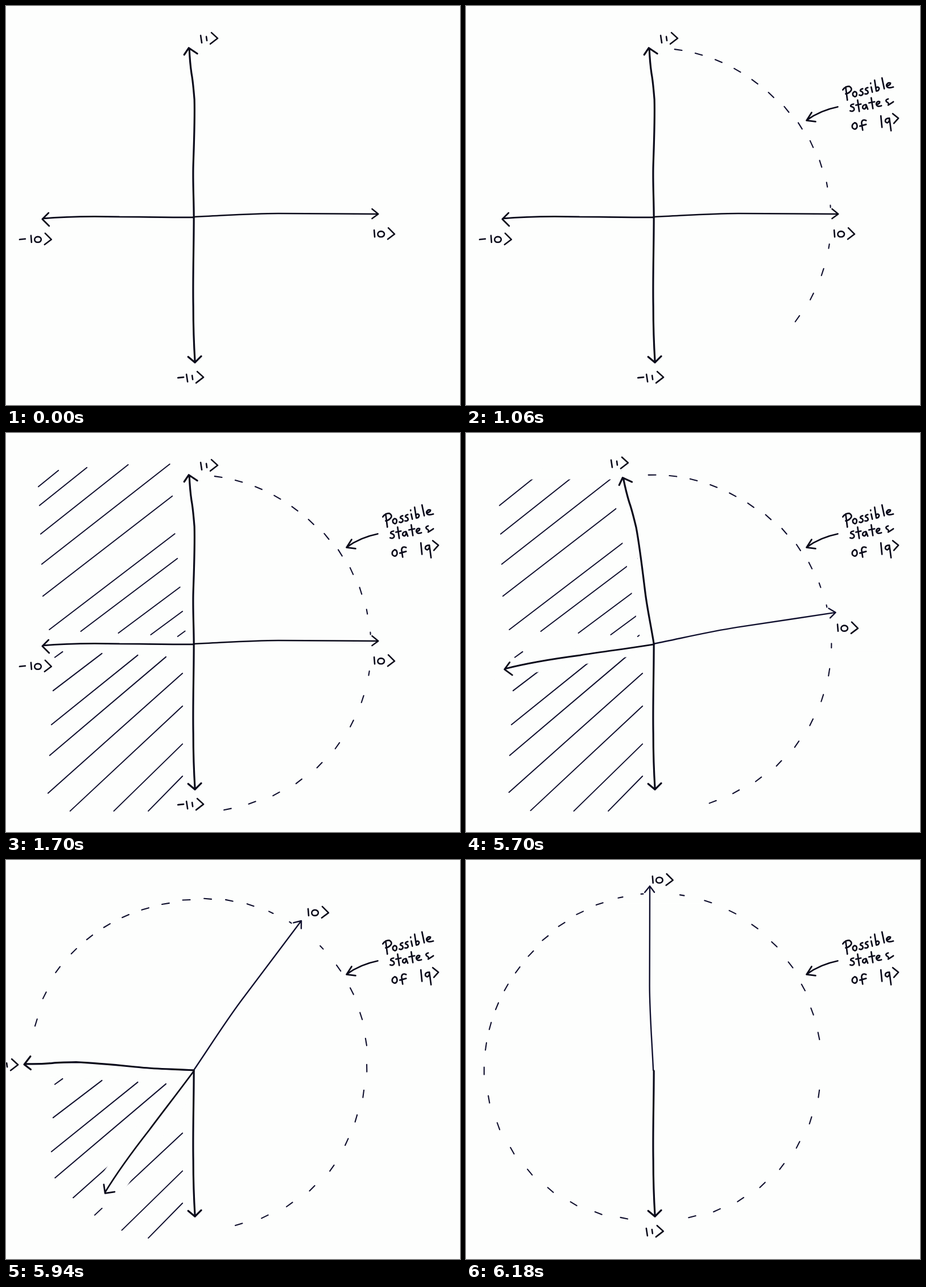
Animation of 798x702 px, one loop 8 s. Source, as an HTML page with a canvas:

```html
<!DOCTYPE html>
<html lang="en">
<head>
<meta charset="utf-8">
<title>Possible states of |q></title>
<style>
html, body { margin: 0; width: 100%; height: 100%; overflow: hidden; background: #fdfefd; }
canvas { display: block; }
</style>
</head>
<body>
<canvas id="stage" width="798" height="702" role="img" aria-label="Axes |0>, |1>, -|0>, -|1>. Possible states of |q>"></canvas>
<script>
const g = document.getElementById('stage').getContext('2d');
const PAPER = '#fdfefd', INK = '#0a0a1a', BLUE = '#10102e';
const W = 800, H = 704, CX = 330, CY = 372, RAD = Math.PI / 180;
const sin = deg => Math.sin(deg * RAD), cos = deg => Math.cos(deg * RAD);
const clamp = (v, lo, hi) => Math.max(lo, Math.min(hi, v));

const shapes = {
  right: 'M331 372C380 370 430 366 480 366S600 367 655 367M645 358L656 367L645 375',
  left: 'M331 373C270 373 240 372 200 372Q120 370 65 375M75 365L64 376L76 388',
  up: 'M331 372C331 340 329 310 330 280S333 200 332 165C330 140 329 130 327 120Q324 100 323 75M314 86L322 74L337 84',
  down: 'M331 372C331 430 329 480 330 530Q330 580 333 628M321 619L333 629L344 618',
  pointer: 'M655 178Q625 184 601 201M609 188L600 202L616 204',
  one: 'M-14-5l2 13M-4-3l1 7M5-10L16 0L3 10',
  zero: 'M-18-6l1 12M-6-4c-7 0-8 10 0 10c8 0 8-10 0-10M7-10L18 1L6 10',
  minus: 'M-5 0l10-1',
  note: 'M669 143l3 23M664 148q5-7 12-6q6 4 1 9q-4 4-8 4' +
    'M685 151q-5 2-3 7q4 4 6 0q2-6-3-7M699 146q-5 1-4 4q6 2 4 6q-2 3-6 1' +
    'M708 144q-5 1-4 4q6 2 4 6q-2 2-5 1M714 143l2 9M713 136v1' +
    'M720 131l3 19q5 0 5-5q-2-4-6 0M733 127l4 19M741 141q7-1 7-5q-4-2-7 3q0 8 12 4' +
    'M683 173q-6 1-5 4q7 2 6 6q-2 4-7 2M690 166l3 20M687 175l9-2' +
    'M704 174q-6 1-5 6q4 4 6-2v-4l3 8M714 162l3 19M710 171l10-2' +
    'M723 174q6-1 6-5q-4-2-6 3q0 7 9 4M744 164q-6 2-3 5q5 2 3 6l9-6' +
    'M685 206q-6 3-4 9q5 5 8-1q1-7-4-8M705 202q-7-3-8 4l2 13M694 212l11-3' +
    'M731 194l2 20M746 198q-8 0-7 6q4 5 7-2v-4l3 22M752 190l10 8l-8 9'
};
for (const k in shapes) shapes[k] = new Path2D(shapes[k]);

const series = (n, from, gap) => Array.from({ length: n }, (_, i) => from + gap * i);

// Dash angles, counted from the |0> axis
const halfCircle = [...series(12, 81.5, -7.1), ...series(9, -9.5, -8.6)];
const leftDashes = series(9, 89.8, 9.85), rightDashes = series(9, -88.5, -9.6);

// Hatching: where each stroke crosses x = 190, above and below the axis
const above = [-13, 23, 76, 132, 191, 260, 306, 359, 404, 441];
const below = [321, 373, 426, 473, 532, 595, 667, 729];
const hatch = [
  ...above.map((y, i) => stroke(y, 0.81 - 0.009 * i, 57 + 2 * i, 275 + 4.5 * i, 66 - 5 * i, 332 + 3 * i)),
  ...below.map((y, i) => stroke(y, 0.72 + 0.043 * i, 86 - 3 * i, 311, 386 + 3 * i, 667))
];

function stroke(y, slope, left, right, top, bottom) {
  const x1 = Math.max(left, 190 - (bottom - y) / slope);
  const x2 = Math.min(right, 190 + (y - top) / slope);
  return [x1, y - slope * (x1 - 190), x2, y - slope * (x2 - 190)];
}

// Turn of each arrow in degrees, one key every second step
const turn0 = [8.9, 36.1, 70.7, 90.2], turn1 = [8.9, 54.3, 118.3, 178.5];

function turnAt(keys, step) {
  const i = Math.min(step >> 1, keys.length - 2);
  return keys[i] + (keys[i + 1] - keys[i]) * (step / 2 - i);
}

function ink(path, width, color = INK) {
  g.lineWidth = width;
  g.strokeStyle = color;
  g.stroke(path);
}

function segment(x1, y1, x2, y2, width, color) {
  const p = new Path2D();
  p.moveTo(x1, y1);
  p.lineTo(x2, y2);
  ink(p, width, color);
}

function turned(deg, draw) {
  g.save();
  g.translate(CX, CY);
  g.rotate(-deg * RAD);
  g.translate(-CX, -CY);
  draw();
  g.restore();
}

function label(path, x, y) {
  g.save();
  g.translate(x, y);
  ink(path, 2.6);
  g.restore();
}

// Slightly uneven circle; dashes shrink towards the |0> axis
function dash(deg) {
  const far = Math.abs(deg);
  const r = far < 88 ? 298 + 16 * Math.max(0, cos(1.5 * (deg + 12))) : 298 - 0.42 * (far - 90);
  const half = Math.min(13, 2 + far * 0.6) / 2;
  turned(deg, () => segment(CX + r, CY - half, CX + r, CY + half, 2.1, BLUE));
}

function drawHatch(count, step, r0, r1) {
  const moving = step >= 0, edge = 91.5 + r1;
  g.save();
  if (moving) {
    g.beginPath();
    g.moveTo(CX, CY);
    g.arc(CX, CY, 366 - 19 * step, -edge * RAD, -270 * RAD, true);
    g.clip();
  }
  hatch.slice(0, count).forEach(h => segment(...h, 2, BLUE));
  if (moving) {
    // Keep clear of the arrows and of everything above the |1> tip
    g.lineCap = 'butt';
    turned(edge, () => segment(CX, CY, CX + 400, CY, 42, PAPER));
    turned(r0, () => segment(CX, CY, 40, 376, 30 + 6 * step, PAPER));
    g.fillRect(0, 0, CX, CY - 295 * Math.max(0, sin(edge)));
  }
  g.restore();
}

const stepsSince = (t, start, max) => clamp(Math.floor((t - start) / 80) + 1, 0, max);

function draw(t) {
  const arcSteps = stepsSince(t, 500, 11);
  const hatchSteps = stepsSince(t, 1380, 5);
  const step = stepsSince(t, 5700, 7) - 1;
  const moving = step >= 0, done = step === 6;
  const r0 = moving ? turnAt(turn0, step) : 0, r1 = moving ? turnAt(turn1, step) : 0;

  // |0> label swings around the centre just behind its arrow
  const a0 = r0 - 5 + 3.4 * sin(1.6 * r0), far0 = 338 + 19 * sin(2 * r0);
  const x0 = CX + far0 * cos(a0), y0 = CY - far0 * sin(a0);

  g.setTransform(798 / W, 0, 0, 702 / H, 0, 0);
  g.fillStyle = PAPER;
  g.fillRect(0, 0, W, H);
  g.lineCap = g.lineJoin = 'round';

  if (!done) drawHatch(Math.ceil(hatch.length * hatchSteps / 5), step, r0, r1);

  if (arcSteps > 3) {
    ink(shapes.note, 2.7);
    if (moving) g.fillRect(x0 - 72, y0 - 42, 144, 84);
    ink(shapes.pointer, 2.8);
  }

  turned(r0, () => {
    halfCircle.slice(0, arcSteps * 2).forEach(dash);
    if (moving) {
      leftDashes.filter(a => a + r0 < 81.5 + r1).forEach(dash);
      rightDashes.filter(a => a + r0 > -76 && a + r0 < -5).forEach(dash);
    }
    ink(shapes.right, 2.4, moving ? BLUE : INK);
    if (!done) ink(shapes.left, 2.8);
  });
  if (!done) turned(r1, () => ink(shapes.up, 3.2));
  ink(shapes.down, 3.2);

  label(shapes.zero, x0, y0);
  if (moving) {
    const a1 = r1 + 91.8;
    label(shapes.one, CX + 325 * cos(a1), Math.min(655, CY - 325 * sin(a1)));
  } else {
    label(shapes.one, 357, 57);
    label(shapes.minus, 29, 412);
    label(shapes.zero, 62, 411);
    label(shapes.minus, 308, 656);
    label(shapes.one, 332, 655);
  }
}

function frame() {
  draw(performance.now() % 8000);
  requestAnimationFrame(frame);
}
frame();
</script>
</body>
</html>
```
